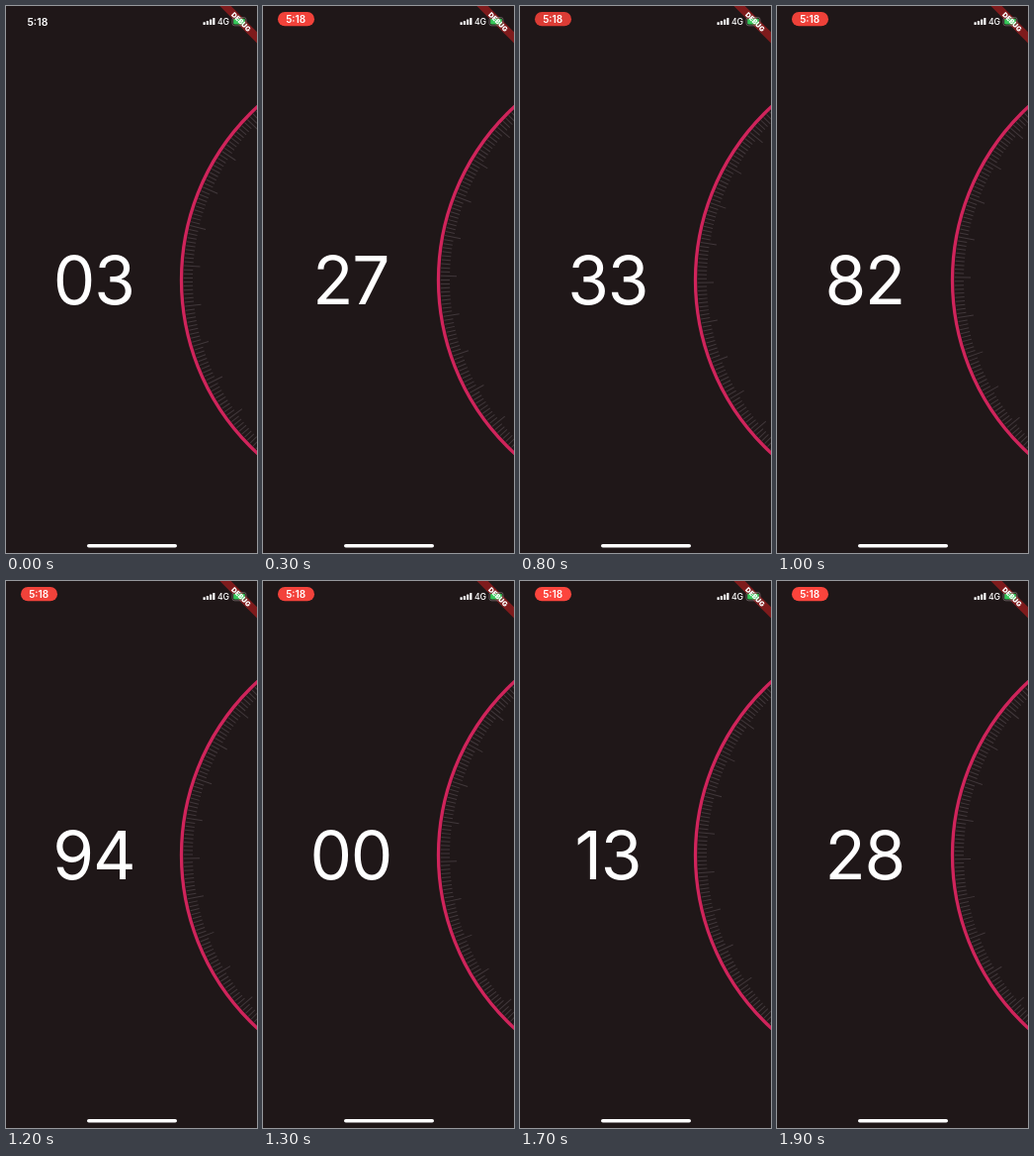
An HTML page that plays this animation: 254 by 552 pixels, repeating every 2000 ms.

```html
<!DOCTYPE html>
<html lang="en">
<head>
<meta charset="utf-8">
<title>Dial counter</title>
<style>
  html, body { margin: 0; width: 100%; height: 100%; overflow: hidden; background: #1f1718; }
  svg { display: block; width: 254px; height: 552px; }
  text { font-family: Inter, sans-serif; fill: #fff; text-anchor: middle; }
  .status { font-weight: 600; }
  #number { font-size: 67.5px; font-weight: 430; letter-spacing: -1.2px; }
</style>
</head>
<body>
<svg viewBox="0 0 254 552">
  <rect width="254" height="552" fill="#1f1718"/>

  <g transform="translate(414.7 276.5)" fill="none">
    <path id="ticks" stroke="#40373a" stroke-width="1"/>
    <circle r="237.2" stroke="#cf245b" stroke-width="3.3"/>
  </g>

  <text id="number" x="88.8" y="300.5"></text>

  <text id="clock" class="status" x="31.9" y="19.5" font-size="10.5">5:18</text>
  <g id="pill">
    <rect id="pillShape" x="15" y="6" width="37" height="14.3" rx="7.15"/>
    <text class="status" x="33.2" y="17" font-size="10">5:18</text>
  </g>

  <g fill="#fff">
    <rect x="199.5" y="16.2" width="2.2" height="2.8" rx=".6"/>
    <rect x="202.8" y="15" width="2.2" height="4" rx=".6"/>
    <rect x="206" y="13.5" width="2.2" height="5.5" rx=".6"/>
    <rect x="209.2" y="12" width="2.2" height="7" rx=".6"/>
  </g>
  <text x="220" y="19" font-size="8.7" font-weight="500">4G</text>

  <g transform="translate(254 0) rotate(45)">
    <rect x="-28" y="18.6" width="56" height="8" fill="#7e1b1c"/>
  </g>
  <rect x="229" y="11.5" width="14" height="8.3" rx="2.3" fill="none" stroke="#7d7475" stroke-width=".7"/>
  <rect x="230.2" y="12.7" width="11.6" height="5.9" rx="1.3" fill="#35c759"/>
  <g transform="translate(254 0) rotate(45)">
    <text y="25.2" font-size="7" font-weight="900">DEBUG</text>
  </g>

  <rect x="82" y="543" width="91" height="3.6" rx="1.8" fill="#fff"/>
</svg>
<script>
  const LOOP = 2000, STEP = 100;
  const DEGREES_PER_UNIT = 1.8;
  const byId = id => document.getElementById(id);
  const ticks = byId("ticks"), number = byId("number");
  const clock = byId("clock"), pill = byId("pill"), pillShape = byId("pillShape");

  // [time in ms, dial value]; the counter shows the value modulo 100
  const dialKeys = [[0, 3.55], [500, 42.9], [800, 33.65], [1000, 82.9],
                    [1300, 100.85], [1500, 98.75], [1900, 128.3]];
  // [time in ms, brightness of the recording pill]
  const pillKeys = [[0, 1], [500, .93], [800, .87], [1000, .94], [1300, .96], [1500, 1], [1900, .99]];

  function sample(keys, t) {
    const i = Math.max(1, keys.findIndex(([time]) => time >= t));
    const [t0, v0] = keys[i - 1], [t1, v1] = keys[i];
    return v0 + (v1 - v0) * (t - t0) / (t1 - t0);
  }

  function tickPath() {
    let d = "";
    for (let deg = 0; deg < 360; deg++) {
      const a = deg * Math.PI / 180;
      const point = r => `${(-r * Math.cos(a)).toFixed(2)} ${(-r * Math.sin(a)).toFixed(2)}`;
      d += `M${point(235)}L${point(deg % 10 ? 225.7 : 218.7)}`;
    }
    return d;
  }

  function draw(now) {
    const t = Math.floor(now % LOOP / STEP) * STEP;
    const value = sample(dialKeys, t);
    number.textContent = String(Math.floor(value) % 100).padStart(2, "0");
    ticks.setAttribute("transform", `rotate(${9.9 - DEGREES_PER_UNIT * value})`);

    const recording = t > 0;
    clock.style.display = recording ? "none" : "";
    pill.style.display = recording ? "" : "none";
    const glow = sample(pillKeys, t);
    pillShape.setAttribute("fill", `rgb(${253 * glow}, ${69 * glow}, ${61 * glow})`);
  }

  ticks.setAttribute("d", tickPath());
  const start = performance.now();
  function frame() {
    draw(performance.now() - start);
    requestAnimationFrame(frame);
  }
  frame();
</script>
</body>
</html>
```
